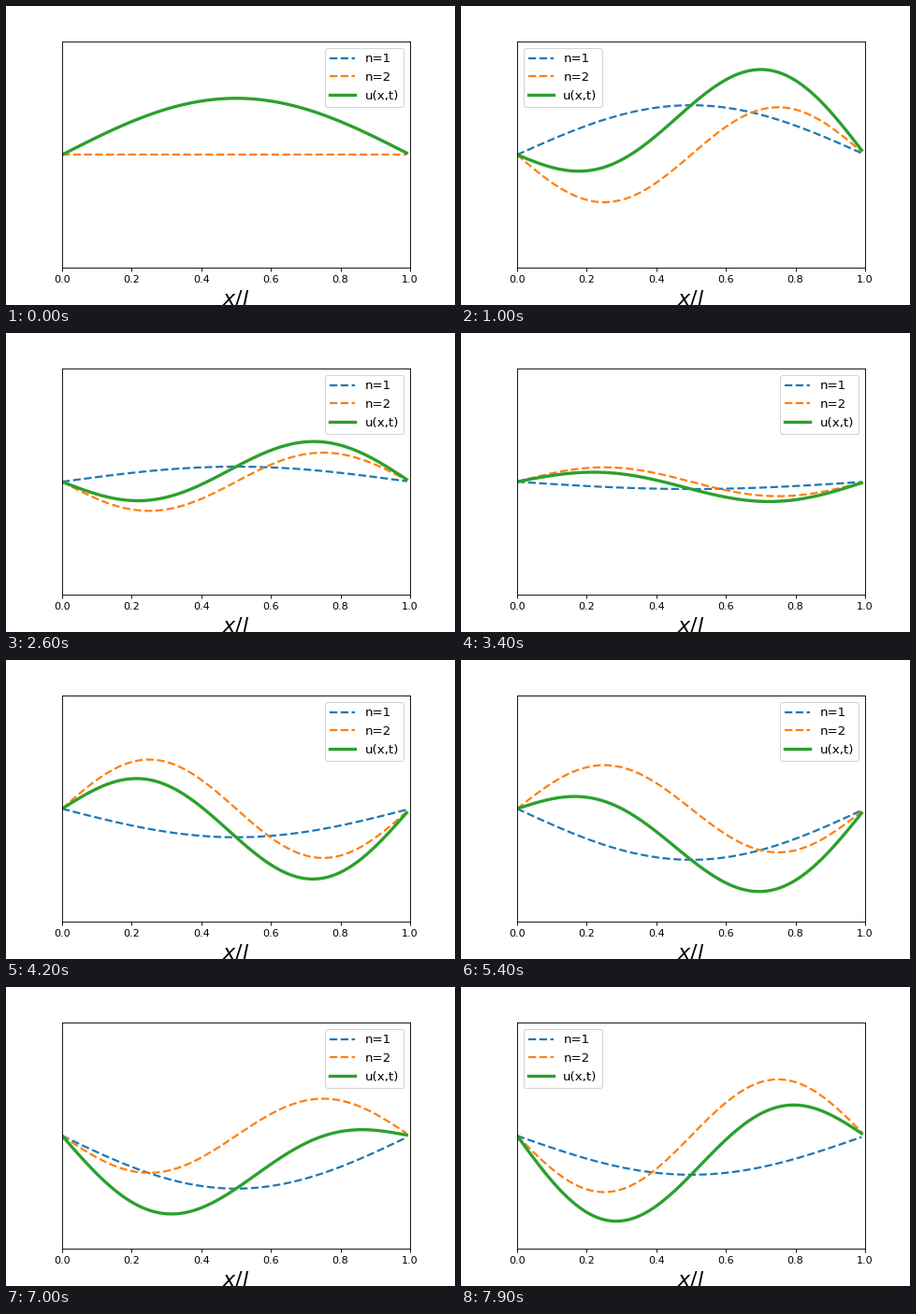
A matplotlib script for the animation above (8000 ms loop, 480 by 320 pixels).

```python
import matplotlib.pyplot as plt
import numpy as np
from matplotlib.animation import FuncAnimation

FRAMES = 80
INTERVAL = 100  # ms
DT = 0.1
OMEGA = 0.5

x = np.arange(0, 1, 0.01)


def mode1(t):
    return np.cos(OMEGA * t) * np.sin(np.pi * x)


def mode2(t):
    return -np.sin(2 * OMEGA * t) * np.sin(2 * np.pi * x)


fig, ax = plt.subplots(figsize=(6, 4), dpi=80)
fig.subplots_adjust(left=0.125, right=0.9, bottom=0.125, top=0.88)
ax.set_xlim(0, 1)
ax.set_ylim(-2, 2)
ax.set_yticks([])
ax.set_xlabel("$x/l$", fontsize=20)

first, = ax.plot(x, mode1(0), "--", lw=2, label="n=1")
second, = ax.plot(x, mode2(0), "--", lw=2, label="n=2")
total, = ax.plot(x, mode1(0) + mode2(0), lw=3, label="u(x,t)")
# "best" moves the legend away from the curves on every draw
ax.legend(loc="best", fontsize=12)


def update(i):
    a, b = mode1(i * DT), mode2(i * DT)
    first.set_ydata(a)
    second.set_ydata(b)
    total.set_ydata(a + b)
    return first, second, total


anim = FuncAnimation(fig, update, frames=FRAMES, interval=INTERVAL,
                     repeat=True, repeat_delay=0, blit=False)
plt.show()
```
